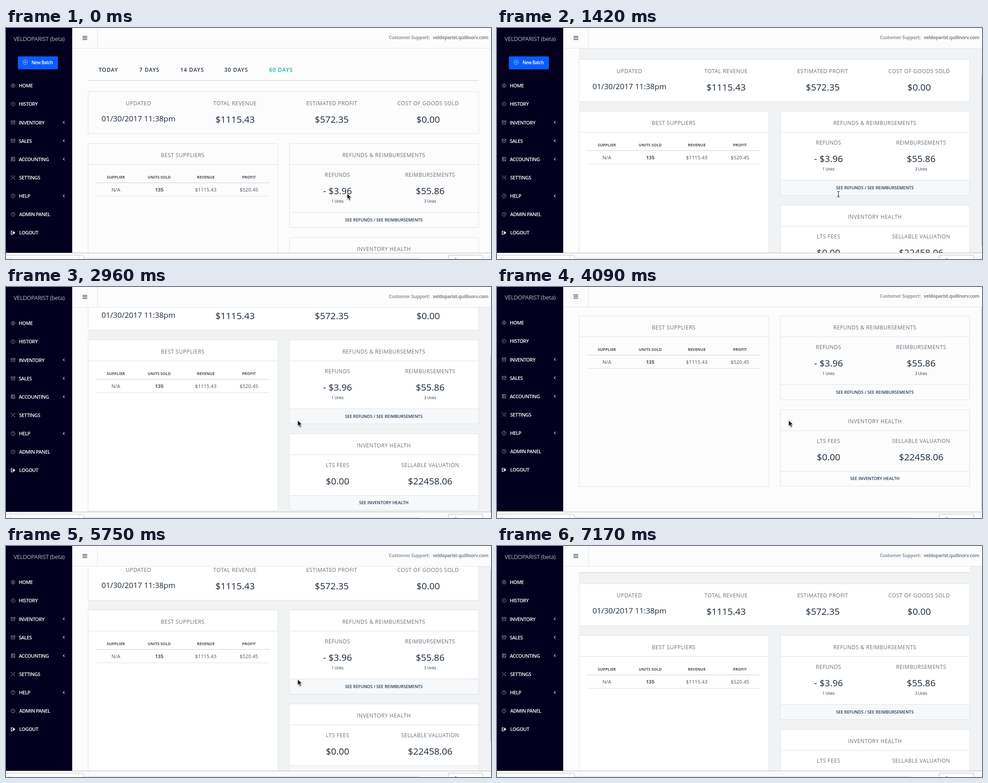
Write an HTML page that moves like this. It is 1084 px wide and 517 px high and loops after 7.91 s.

```html
<!DOCTYPE html>
<html lang="en">
<head>
<meta charset="utf-8">
<title>Dashboard scroll</title>
<style>
html, body { margin: 0; width: 100%; height: 100%; overflow: hidden; background: #fcfcfd; }
svg { display: block; width: 100vw; height: 100vh; font-family: "Open Sans", "Noto Sans", sans-serif; }
text { white-space: pre; }
.card { fill: var(--card); stroke: #dfe2e5; }
.foot { fill: var(--foot); }
.rule { stroke: #dfe2e5; }
.icon { fill: none; stroke: #9a9bad; stroke-width: .9; }
.label { fill: #68717a; font-size: 12px; letter-spacing: .5px; }
.value { fill: #1b2a38; font-size: 20.6px; }
.date { fill: #1b2a38; font-size: 17.1px; }
.units { fill: #1b2a38; font-size: 8.3px; }
.link { fill: #22374d; font-size: 9.5px; font-weight: 600; }
.tab { fill: #26374a; font-size: 12px; font-weight: 600; letter-spacing: 1px; }
.tab.on { fill: #0bb39c; }
.th { fill: #4c5359; font-size: 8.7px; font-weight: 700; }
.td { fill: #50575d; font-size: 11.2px; }
.td.strong { font-weight: 700; }
.menu { fill: #fff; font-size: 11px; font-weight: 600; letter-spacing: -.5px; }
.brand { fill: #b4b6c4; font-size: 13px; letter-spacing: -.4px; }
.button { fill: #fff; font-size: 10px; font-weight: 600; letter-spacing: -.5px; }
.support { fill: #979ba0; font-size: 10.5px; font-weight: 700; letter-spacing: -.4px; }
.support.site { fill: #85898e; }
</style>
</head>
<body>
<svg id="stage" viewBox="0 0 1084 517" preserveAspectRatio="none"></svg>
<script>
const LOOP = 7910;
const stage = document.getElementById('stage');

function add(parent, tag, attrs = {}, content) {
  const el = document.createElementNS('http://www.w3.org/2000/svg', tag);
  for (const key in attrs) el.setAttribute(key, attrs[key]);
  if (content) el.textContent = content;
  parent.append(el);
  return el;
}
const group = parent => add(parent, 'g');
const rect = (parent, x, y, width, height, attrs) => add(parent, 'rect', { x, y, width, height, ...attrs });
const path = (parent, d, attrs) => add(parent, 'path', { d, ...attrs });
const rule = (parent, x1, x2, y, stroke = '#dfe2e5') => path(parent, `M${x1} ${y}H${x2}`, { stroke });

// y is the middle of the capital letters
const capShift = { label: 4.3, value: 7.4, date: 6.1, units: 3, link: 3.4, tab: 4.3, th: 3.1, td: 4, menu: 4, brand: 4.6, button: 3.6, support: 3.7 };
function write(parent, style, x, y, content, anchor = 'middle') {
  const base = y + capShift[style.split(' ')[0]];
  return add(parent, 'text', { class: style, x, y: base, 'text-anchor': anchor }, content);
}

const page = group(stage);
rect(page, 148, 0, 936, 518, { fill: '#fcfcfd' });
rect(page, 183, 46, 901, 457, { style: 'fill:var(--bg)' });
const content = group(page);

function buildContent(g) {
  rect(g, 183, 71, 873, 46, { style: 'fill:var(--card)' });
  rule(g, 183, 1056.5, 117.5, '#cbd0d2');
  [[207, 'TODAY'], [298, '7 DAYS'], [389.5, '14 DAYS'], [488, '30 DAYS'], [588, '60 DAYS']]
    .forEach(([x, name], i) => write(g, i === 4 ? 'tab on' : 'tab', x, 94, name, 'start'));

  rect(g, 183.5, 142.5, 873, 94, { class: 'card' });
  [[296, 'UPDATED', '01/30/2017 11:38pm'], [512, 'TOTAL REVENUE', '$1115.43'],
   [728, 'ESTIMATED PROFIT', '$572.35'], [943.5, 'COST OF GOODS SOLD', '$0.00']]
    .forEach(([x, label, value], i) => {
      write(g, 'label', x, 169, label);
      write(g, i ? 'value' : 'date', x, i ? 204.5 : 203, value);
    });

  rect(g, 183.5, 258.5, 424, 382, { class: 'card' });
  rule(g, 183, 607, 305.5);
  write(g, 'label', 395, 284.5, 'BEST SUPPLIERS');
  [[245.5, 'SUPPLIER', 'N/A'], [342.5, 'UNITS SOLD', '135'], [446.5, 'REVENUE', '$1115.43'], [543, 'PROFIT', '$520.45']]
    .forEach(([x, head, cell], i) => {
      write(g, 'th', x, 334, head);
      write(g, i === 1 ? 'td strong' : 'td', x, 362, cell);
    });
  rule(g, 201, 588.5, 346.5, '#cccfd1');
  rule(g, 201, 588.5, 376.5, '#dddfe1');

  sideCard(g, 258.5, 188, 154, 'REFUNDS & REIMBURSEMENTS', 'SEE REFUNDS / SEE REIMBURSEMENTS',
    [['REFUNDS', '- $3.96', '1 Units'], ['REIMBURSEMENTS', '$55.86', '3 Units']]);
  sideCard(g, 468.5, 171, 138, 'INVENTORY HEALTH', 'SEE INVENTORY HEALTH',
    [['LTS FEES', '$0.00'], ['SELLABLE VALUATION', '$22458.06']]);
}

function sideCard(g, top, height, footTop, title, link, columns) {
  rect(g, 633.5, top, 423, height, { class: 'card' });
  rect(g, 634, top + footTop, 422, height - footTop - .5, { class: 'foot' });
  rule(g, 633, 1056, top + 47);
  rule(g, 633, 1056, top + footTop);
  write(g, 'label', 844.5, top + 26, title);
  write(g, 'link', 844.5, top + (footTop + height) / 2 - .3, link);
  columns.forEach(([label, value, units], i) => {
    const x = i ? 948 : 741;
    write(g, 'label', x, top + 70.5, label);
    write(g, 'value', x, top + 106.5, value);
    if (units) write(g, 'units', x, top + 129, units);
  });
}
buildContent(content);

// header
rect(page, 148, -4, 936, 49.5, { fill: '#fcfcfd' });
rule(page, 148, 1084, 45.5, '#e2e4e7');
path(page, 'M204.5 0V45', { stroke: '#e2e4e7' });
path(page, 'M171 18.8h10.5M171 22.3h10.5M171 25.8h10.5', { stroke: '#3c444c', 'stroke-width': 1.5 });
write(page, 'support', 855.5, 21.5, 'Customer Support:', 'start');
write(page, 'support site', 1078, 21.5, 'veldoparist.quillnorv.com', 'end');

// sidebar
rect(page, 0, -4, 148, 507, { fill: '#02001e' });
write(page, 'brand', 17, 24, 'VELDOPARIST (beta)', 'start');
const newBatch = group(page);
rect(newBatch, 26.5, 63.5, 89.5, 29, { rx: 2, fill: '#0a5cff' });
path(newBatch, 'M38 76.5a5 5 0 1 0 10 0a5 5 0 1 0-10 0M40.5 76.5h5M43 74v5', { class: 'icon', style: 'stroke:#b9d0ff' });
write(newBatch, 'button', 57, 77.2, 'New Batch', 'start');

const ring = 'M-4.3 0a4.3 4.3 0 1 0 8.6 0a4.3 4.3 0 1 0-8.6 0';
const box = 'M-4.5-3.7h9v2.4h-9zM-3.9-1.3v5h7.8v-5M-1.5.8h3';
const ask = ring + 'M-1.4-1a1.4 1.4 0 1 1 2 1.3q-.6.3-.6 1M0 2v.9';
const icons = {
  home: ring + 'M-1.4-1a1.4 1.6 0 1 0 2.8 0a1.4 1.6 0 1 0-2.8 0M-2.6 3q2.6-3.4 5.2 0',
  clock: ring + 'M0-2.6V.3H-2',
  box,
  book: 'M-4-4.2h8v8.4h-8zM-4 2h8M-2-2.5h4M-2-.6h4M-2.6-4v6',
  tools: 'M-4.3-4.3L4.2 4.2M4.2-4.2L-4.2 4.2M2-4.4L4.4-2M-4.4-3L-3-4.4M2.4 4.2L4.2 2.4',
  ask,
  exit: 'M-.8-3.6h-3.4v7.2h3.4M-2 0h5M1-2.6L3.8 0L1 2.6z'
};
const menu = group(page);
[['HOME', 'home', 28.5], ['HISTORY', 'clock', 28.5], ['INVENTORY', 'box', 28.5, 1], ['SALES', 'box', 28.5, 1],
 ['ACCOUNTING', 'book', 28.5, 1], ['SETTINGS', 'tools', 29.5], ['HELP', 'ask', 29, 1],
 ['ADMIN PANEL', 'ask', 29.5], ['LOGOUT', 'exit', 29.5]]
  .forEach(([name, icon, x, opens], i) => {
    const y = 129 + i * 41.15;
    const bold = icon === 'exit' ? 'stroke:#fff;stroke-width:1.4' : '';
    path(menu, icons[icon], { class: 'icon', style: bold, transform: `translate(15.8 ${y})` });
    write(menu, 'menu', x, y + .2, name, 'start');
    if (opens) path(menu, `M130.7 ${y - 3}l-2.8 2.8l2.8 2.8`, { fill: 'none', stroke: '#e4e4ec', 'stroke-width': 1.2 });
  });

const thumb = rect(page, 1083, 0, 1, 1, { fill: '#a4a7ab' });

// download shelf
const shelf = group(stage);
rect(shelf, 0, 503, 1084, 14, { fill: '#fafafa' });
rule(shelf, 0, 1084, 503.5, '#b9babc');
path(shelf, 'M0 508.5H170Q173.500 508.5 173.500 512V517', { fill: '#fefefe', stroke: '#c4c5c7' });
path(shelf, 'M162.500 509V517', { stroke: '#d3d4d6' });
path(shelf, 'M174 516H925', { stroke: '#cfd0d2' });
path(shelf, 'M8 517v-2h4l2 2', { fill: 'none', stroke: '#d5d6d8' });
path(shelf, 'M988.5 517V510Q988.5 508.5 990 508.5H1064Q1065.500 508.5 1065.500 510V517', { fill: '#fff', stroke: '#b9babc' });
rect(shelf, 1003, 516, 4, 1, { fill: '#55585c' });

// pointers
const arrow = path(stage, 'M0-.5V12.3L3 9.6L5.100 14.500L7.500 13.500L5.400 8.800H9.600Z',
  { fill: '#0b0b0d', stroke: '#fff', 'stroke-width': .9, style: 'filter:drop-shadow(0 1px 1px #0006)' });
const beam = path(stage, 'M-3-6.500Q0-6.500 0-4.500Q0-6.500 3-6.500M0-5V5M-3 6.500Q0 6.500 0 4.500Q0 6.500 3 6.500M-1.500 2h3',
  { fill: 'none', stroke: '#222' });

// rows: time, value(s) held until the next row
const scrollSteps = [[0, 0], [140, 14], [320, 26], [950, 31], [1120, 43], [1270, 58], [1420, 72], [1600, 84], [1750, 93], [1900, 98],
  [2630, 112], [2800, 140], [2970, 174], [3140, 193],
  [5250, 189], [5390, 168], [5570, 140], [5750, 115], [5920, 93], [6100, 72], [6280, 58]];
const bounceSteps = [[0, 0], [3770, 1], [3930, 2], [4090, 1], [4740, 0]];
const pointerSteps = [[0, 762.5, 371], [1270, 763, 372, 'beam'], [1600, 762.5, 371], [2050, 722, 345], [2200, 680, 317], [2340, 652, 299],
  [6580, 690, 335], [6730, 800, 400], [6880, 900, 452], [7030, 985, 500], [7170, 1100, 540]];
const thumbSteps = [[0, 0], [140, 1], [600, 0], [950, 1], [2050, 0], [2630, 1], [3770, 46, 500], [5570, 52, 437], [6580, 0]];
const COLLAPSE = 2800;

function at(steps, time) {
  let row = steps[0];
  for (const step of steps) if (step[0] <= time) row = step;
  return row.slice(1);
}

function draw(time) {
  const [scroll] = at(scrollSteps, time);
  const [bounce] = at(bounceSteps, time);
  const [x, y, kind] = at(pointerSteps, time);
  const collapsed = time >= COLLAPSE;
  const pale = time < 140 || (time >= 3770 && time < 5250);

  page.setAttribute('transform', `translate(0 ${-bounce})`);
  content.setAttribute('transform', `translate(0 ${-scroll})`);
  menu.setAttribute('transform', `translate(0 ${collapsed ? -48 : 0})`);
  newBatch.style.display = collapsed ? 'none' : '';

  stage.style.setProperty('--bg', pale ? '#fcfcfd' : '#f1f2f4');
  stage.style.setProperty('--card', pale ? '#fcfcfd' : '#fff');
  stage.style.setProperty('--foot', pale ? '#fcfcfd' : '#f6f8fa');

  let [top, bottom] = at(thumbSteps, time);
  thumb.style.display = top ? '' : 'none';
  if (!bottom) {
    top = 50 + scroll * .763;
    bottom = Math.min(503, top + 384);
  }
  thumb.setAttribute('y', top);
  thumb.setAttribute('height', bottom - top);

  for (const [el, shown] of [[arrow, kind !== 'beam'], [beam, kind === 'beam']]) {
    el.style.display = shown ? '' : 'none';
    el.setAttribute('transform', `translate(${x} ${y})`);
  }
}

const start = performance.now();
function tick() {
  draw((performance.now() - start) % LOOP);
  requestAnimationFrame(tick);
}
draw(0);
requestAnimationFrame(tick);
</script>
</body>
</html>
```
